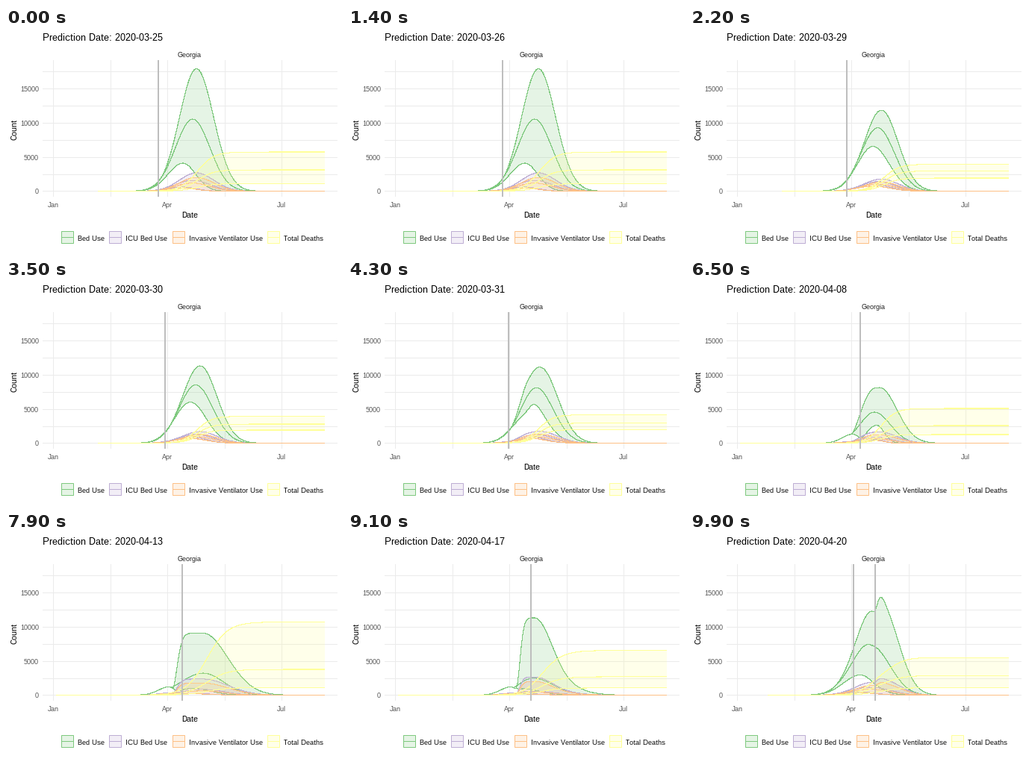
These frames come from a looping animation (450 px wide and 300 px high, 10000 ms). A matplotlib script:

```python
import numpy as np
import matplotlib.pyplot as plt
from matplotlib.animation import FuncAnimation
from matplotlib.colors import to_rgba
from matplotlib.patches import Polygon, Rectangle

W, H, DPI = 450, 300, 100
PX = 72 / DPI                      # points per pixel
BASE, RIGHT = 218.5, 427
N = 217
COLORS = ["#7FC97F", "#BEAED4", "#FDC086", "#FFFF99"]
NAMES = ["Bed Use", "ICU Bed Use", "Invasive Ventilator Use", "Total Deaths"]

plt.rcParams.update({
    "font.family": "Liberation Sans", "text.hinting": "native",
    "text.hinting_factor": 1, "path.snap": False})


def bump(x, c, h, left, right, power=2):
    """Bell curve with its own width per side; power squares off the left."""
    z = np.abs(x - c)
    return h * np.exp(-0.5 * np.where(x < c, (z / left) ** power, (z / right) ** 2))


def state(start, share, deaths, *beds, past=0):
    """Rows: x, then upper / mean / lower for each of the four measures.

    share: ICU beds per bed; deaths: centre, width and three plateaus;
    beds: bump parameters; past: height of the counts already observed.
    """
    x = np.linspace(start, RIGHT, N)
    bed = np.maximum([bump(x, *b) for b in beds], bump(x, 218, past, 14, 9))
    c, w, *plateaus = deaths
    dead = np.outer(plateaus, 1 / (1 + np.exp((c - x) / w)))
    return np.vstack([x, bed, share * bed, 0.75 * share * bed, dead])


def mix(a, b, t):
    return a + (b - a) * t


mar25 = state(123, 0.15, (256, 11, 52.5, 28.5, 10),
              (255, 164, 22.5, 23), (250, 96.5, 23, 23), (237, 37.5, 20, 17))
mar29 = state(123, 0.15, (261, 10, 30.5, 26.5, 20),
              (257, 90, 23, 22), (252, 81, 22, 22), (247, 69, 21, 22))
mar30 = state(123, 0.15, (256, 10, 36, 25.5, 17.5),
              (260, 103.5, 23.5, 22.5), (254, 78, 22, 23), (247, 55, 21, 21))
apr05 = state(123, 0.18, (252, 9.5, 46, 32, 20.5),
              (240, 121, 10.5, 26.5), (247, 63.5, 18, 18), (250, 41.5, 6, 9), past=15)
apr08 = state(67, 0.2, (256, 10, 46.5, 23.5, 11.5),
              (254, 74.5, 24, 23, 3), (247, 41.5, 19.5, 21), (250, 24, 13, 10), past=12)
apr13 = state(67, 0.26, (269, 14, 98, 34.5, 10),
              (264, 83, 33, 33, 8), (264, 29.5, 29, 27), (250, 9, 20, 24), past=11)
apr20 = state(67, 0.23, (256, 11, 46, 21, 9.5),
              (250, 111, 18, 21.5, 6), (245, 22, 18, 22), (230, 9.5, 12, 20), past=11)

STATES = [
    ("03-25", mar25), ("03-26", mar25), ("03-27", mar25), ("03-29", mar29),
    ("03-30", mar30), ("03-31", mar30), ("04-01", mix(mar30, apr05, 0.3)),
    ("04-05", apr05), ("04-07", apr05), ("04-08", apr08),
    ("04-10", mix(apr08, apr13, 0.5)), ("04-13", apr13),
    ("04-17", mix(apr13, apr20, 0.6)), ("04-20", apr20)]
# a step every seven frames, with a few frames more around the first ones
STARTS = [4, 13, 20] + list(range(28, 100, 7))


def date_x(date):
    month, day = map(int, date.split("-"))
    return 63 + (day + {3: 59, 4: 90}[month]) * 153 / 91


def phase(frame):
    """Current state, next state and progress between them."""
    i = sum(frame >= s for s in STARTS) - 1
    if i < 0:
        return 0, 0, 0.0
    steps = 4 if i == 2 else 3
    return i, (i + 1) % len(STATES), min(1, (frame - STARTS[i] + 1) / steps)


fig = plt.figure(figsize=(W / DPI, H / DPI), dpi=DPI, facecolor="white")
ax = fig.add_axes([0, 0, 1, 1])
ax.set_xlim(0, W)
ax.set_ylim(H, 0)
ax.axis("off")


def line(xs, ys, color, width=1, **kw):
    return ax.plot(xs, ys, color=color, lw=width * PX, solid_capstyle="butt", **kw)[0]


def label(x, y, text, size, color="black", va="baseline", **kw):
    return ax.text(x, y, text, fontsize=size * PX, color=color, va=va, **kw)


# Grid and axis labels
for k in range(8):
    y = round(218.49 - 22.97 * k) + 0.5
    line([49, 444], [y, y], "#EBEBEB", zorder=0)
    if k % 2 == 0:
        label(44, y + 3.5, str(2500 * k), 9, "#4D4D4D", ha="right")
for x in (63.5, 140.5, 216.5, 293.5, 369.5):
    line([x, x], [43, 226], "#EBEBEB", zorder=0)
for x, month in ((63, "Jan"), (216, "Apr"), (369, "Jul")):
    label(x, 240, month, 9, "#4D4D4D", ha="center")
label(246, 39, "Georgia", 9, "#1A1A1A", ha="center")
label(246, 254, "Date", 11, ha="center")
label(11.5, 136.5, "Count", 11, rotation=90, ha="center", va="center")
title = label(49, 17, "", 13)

# Legend
for x, color, name in zip((74, 138, 223, 350), COLORS, NAMES):
    ax.add_patch(Rectangle((x + 0.5, 272.5), 16, 16, fc=to_rgba(color, 0.2),
                           ec=color, lw=PX))
    line([x + 1, x + 16], [280.5] * 2, color)
    label(x + 22, 285, name, 9)

# Moving parts; aliased hairlines come out exactly one pixel wide
bands, curves = [], []
for k, color in enumerate(COLORS):
    band = Polygon(np.zeros((3, 2)), fc=to_rgba(color, 0.2), ec="none", zorder=3 + k)
    bands.append(ax.add_patch(band))
    curves += [line([], [], color, 0.05, antialiased=False, zorder=3.5 + k)
               for _ in range(3)]
marker = line([], [], "#BEBEBE", 2, zorder=9)
leftover = line([], [], "#BEBEBE", 2, zorder=9)


def update(frame):
    i, j, t = phase(frame)
    (d0, a), (d1, b) = STATES[i], STATES[j]
    title.set_text("Prediction Date: 2020-" + (d1 if t > 0.7 else d0))

    data = mix(a, b, t)
    x, rows = data[0], BASE - data[1:]
    for curve, y in zip(curves, rows):
        curve.set_data(x, y)
    for k, band in enumerate(bands):
        top, low = rows[3 * k], rows[3 * k + 2]
        band.set_xy(np.column_stack([np.r_[x, x[::-1]], np.r_[top, low[::-1]]]))

    pos = round(mix(date_x(d0), date_x(d1), t))
    marker.set_data([pos, pos], [43, 226])
    # the last date's line lingers while the loop returns to the start
    old = round(date_x(d0))
    leftover.set_data([old, old], [43, 226])
    leftover.set_visible(j < i)
    return [title, marker, leftover, *bands, *curves]


anim = FuncAnimation(fig, update, frames=100, interval=100, repeat=True,
                     repeat_delay=0, blit=False)
plt.show()
```
